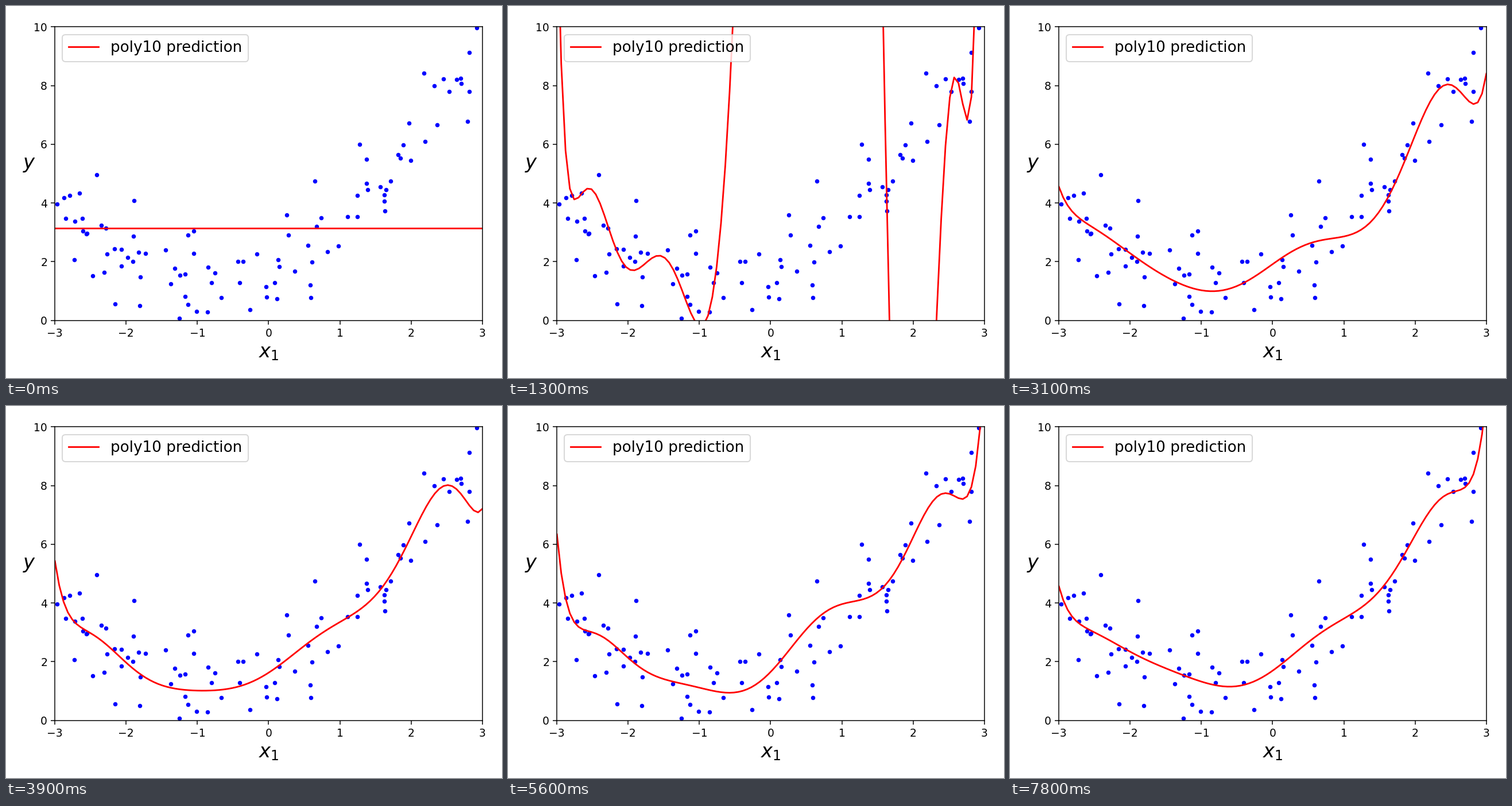
A matplotlib script for the animation above (7900 ms loop, 864 px wide and 648 px high).

```python
import numpy as np
import matplotlib.pyplot as plt
from matplotlib.animation import FuncAnimation

W, H, DPI = 864, 648, 135
DEGREE, N, N_VAL = 10, 100, 20

# Noisy quadratic data
np.random.seed(42)
x = 6 * np.random.rand(N) - 3
y = 0.5 * x**2 + x + 2 + np.random.randn(N)

# Shuffled training part, added to the fit one sample at a time
train = np.random.RandomState(10).permutation(N)[N_VAL:]
grid = np.linspace(-3, 3, 100)


def powers(v):
    return v[:, None] ** np.arange(1, DEGREE + 1)


def predict(count):
    """Least-squares polynomial through the first `count` training samples."""
    idx = train[:count]
    feats, target = powers(x[idx]), y[idx]
    f_mean, t_mean = feats.mean(axis=0), target.mean()
    coef = np.linalg.lstsq(feats - f_mean, target - t_mean,
                           rcond=np.finfo(float).eps)[0]
    return (powers(grid) - f_mean) @ coef + t_mean


fig = plt.figure(figsize=(W / DPI, H / DPI), dpi=DPI)
left, right, top, bottom = 85.2, 829.8, 36.4, 547.6
ax = fig.add_axes([left / W, 1 - bottom / H, (right - left) / W, (bottom - top) / H])
ax.plot(x, y, "b.")
curve, = ax.plot([], [], "r-", label="poly10 prediction")
ax.set_xlim(-3, 3)
ax.set_ylim(0, 10)
ax.set_xlabel("$x_1$", fontsize=18)
ax.set_ylabel("$y$", rotation=0, fontsize=18)
ax.legend(loc="upper left", fontsize=14)


def update(frame):
    curve.set_data(grid, predict(frame + 1))
    return curve,


anim = FuncAnimation(fig, update, frames=len(train) - 1, interval=100,
                     repeat=True, repeat_delay=0)
plt.show()
```
